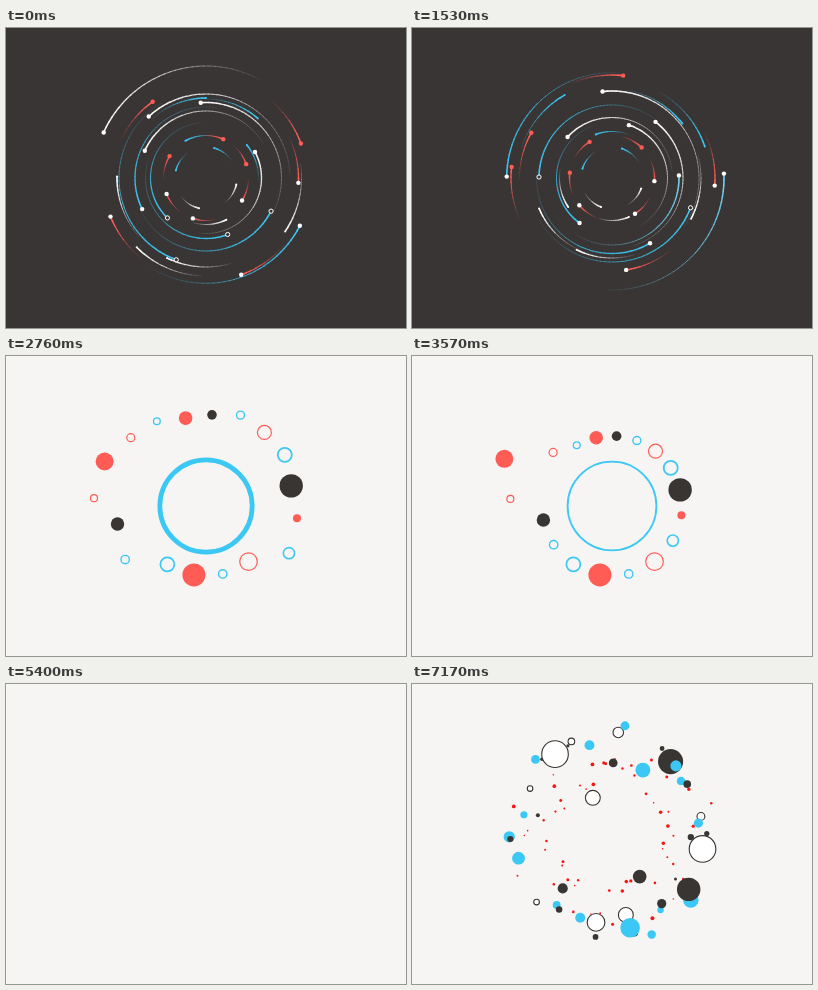
An HTML page with a canvas that plays this animation: 400x300 px, repeating every 7.2 s.

```html
<!DOCTYPE html>
<html lang="en">
<head>
<meta charset="utf-8">
<title>Circles</title>
<style>
html, body { margin: 0; width: 100%; height: 100%; overflow: hidden; background: #3a3535; }
canvas { display: block; width: 100vw; height: 100vh; }
</style>
</head>
<body>
<canvas id="stage"></canvas>
<script>
const W = 400, H = 300, CX = 200, CY = 150, SCENE = 1800, STEP = 30, TAU = Math.PI * 2;
const DARK = '#3a3535', LIGHT = '#f6f5f3', BLUE = '#3cc8f4', RED = '#ff5c55', INK = '#383533', WHITE = '#fff';
const RGB = { blue: [60, 200, 244], red: [255, 92, 85], white: [255, 255, 255] };

const canvas = document.getElementById('stage');
const ctx = canvas.getContext('2d');
const dpr = window.devicePixelRatio || 1;
canvas.width = W * dpr;
canvas.height = H * dpr;
ctx.scale(dpr, dpr);

const clamp = (v, a = 0, b = 1) => Math.min(b, Math.max(a, v));
const lerp = (a, b, k) => a + (b - a) * k;
const easeOut = k => 1 - (1 - k) ** 3;
const easeInOut = k => k * k * (3 - 2 * k);
const rad = d => d * Math.PI / 180;
const mix = (a, b, k) => `rgb(${a.map((v, i) => Math.round(lerp(v, b[i], k))).join()})`;
const polar = (r, deg) => [CX + r * Math.cos(rad(deg)), CY + r * Math.sin(rad(deg))];

function seeded(seed) {
  return () => {
    seed = (seed * 1664525 + 1013904223) % 4294967296;
    return seed / 4294967296;
  };
}

function fillBg(color) {
  ctx.fillStyle = color;
  ctx.fillRect(0, 0, W, H);
}

function disc(x, y, r, fill, stroke, width = 1) {
  ctx.beginPath();
  ctx.arc(x, y, Math.max(0, r), 0, TAU);
  if (fill) { ctx.fillStyle = fill; ctx.fill(); }
  if (stroke) { ctx.strokeStyle = stroke; ctx.lineWidth = width; ctx.stroke(); }
}

// Value at t on a list of [time, value] keys
function track(keys, t) {
  for (let i = 1; i < keys.length; i++) {
    const [t0, a] = keys[i - 1], [t1, b] = keys[i];
    if (t <= t1) return lerp(a, b, easeInOut(clamp((t - t0) / (t1 - t0))));
  }
  return keys[keys.length - 1][1];
}

/* ---- Scene 1: comets on orbits ---- */
// Each group: heads as [radius, angle], tail length, degrees per ms, colours above and below the centre
const comets = [
  { heads: [0, 1, 2, 3].map(i => [31, 12 + i * 91]), tail: () => 40, spin: -0.114, up: 'blue', down: 'white', tip: 1 },
  { heads: [[42.5, 241], [46.5, 64], [52.5, 321]], tail: () => 42, spin: -0.114, up: 'blue', down: 'white', tip: 1 },
  { heads: [[95.5, 34], [98, 135], [79, 311], [80, 270], [89, 181], [89, 116]],
    tail: () => 42, spin: 0.1348, up: 'blue', down: 'white', tip: 1 },
  { heads: [[55.5, 134], [60.5, 69], [73, 27], [84, 227], [87, 110]],
    tail: () => 130, spin: -0.1348, up: 'white', down: 'blue', tip: 2.2, hollow: true },
  { heads: [[55.5, -28], [67, 204], [71, 154], [75.5, 266], [105.3, 27], [112, 204]],
    tail: r => r > 100 ? 94 : 125, spin: -0.1348, up: 'white', down: 'blue', tip: 2.2 },
  { heads: [[101, -20], [103, 70], [103, 158], [93, 235], [92.5, 3]],
    tail: () => 29, spin: 0.1348, up: 'red', down: 'red', tip: 2.2 },
  { heads: [32, 108, 158, 211, 294, 341].map(a => [42.5, a]),
    tail: () => 30, spin: 0.1348, up: 'red', down: 'red', tip: 2.2 }
];

function streak(r, head, len, color) {
  const n = Math.ceil(Math.abs(len) / 3);
  ctx.strokeStyle = color;
  for (let i = 0; i < n; i++) {
    const k = i / n;
    ctx.globalAlpha = lerp(1, 0.2, k);
    ctx.lineWidth = lerp(1.6, 0.3, k);
    ctx.beginPath();
    ctx.arc(CX, CY, r, rad(head + len * k), rad(head + len * (i + 1.15) / n), len < 0);
    ctx.stroke();
  }
  ctx.globalAlpha = 1;
}

function orbits(t) {
  fillBg(DARK);
  for (const { heads, tail, spin, up, down, tip, hollow } of comets) {
    for (const [r, a0] of heads) {
      const a = a0 + spin * t;
      const low = clamp((Math.sin(rad(a)) + 0.1) * 12);
      const color = mix(RGB[up], RGB[down], low);
      streak(r, a, -Math.sign(spin) * tail(r), color);
      if (hollow && low > 0.5) disc(...polar(r, a), 2.1, DARK, WHITE, 1);
      else disc(...polar(r, a), tip, tip < 2 ? color : mix(RGB[up], RGB.white, low));
    }
  }
}

/* ---- Scene 2: ring and bubbles ---- */
// One letter per bubble around the ring, capitals are filled
const kinds = 'rRrbRKbrbKRbrbRbbK';
const sizes = [3.5, 9, 4, 3.4, 6.8, 4.8, 4, 7, 7, 11.7, 4, 5.6, 8.8, 4.2, 11.5, 7, 4.2, 6.7];
const paint = { r: RED, b: BLUE, k: INK };

const bubbles = [...kinds].map((kind, i) => {
  const size = sizes[i], filled = kind < 'a';
  const leftBump = 52 * Math.exp(-((i - 0.7) ** 2));
  return {
    size, filled, color: paint[kind.toLowerCase()],
    angle: -176 + 20.3 * i - 10 * (1 - Math.cos(i * TAU / 18)),
    far: filled ? 114 - size : 128 - 2 * size,
    end: 70 + leftBump
  };
});

function ring(t) {
  fillBg(LIGHT);
  const grow = easeOut(clamp(t / 240));
  for (const { size, filled, color, angle, far, end } of bubbles) {
    const back = Math.sin(rad(angle)) > 0.7 ? 470 : 1770;
    const d = t < 240 ? far * grow : track([[240, far], [back, end]], t);
    const [x, y] = polar(d, angle);
    if (filled) disc(x, y, size * grow, color);
    else disc(x, y, size * grow, null, color, color === RED ? 1.2 : 0.9 + size * 0.12);
  }
  const outer = track([[0, 0], [240, 96], [480, 84], [1050, 46], [1770, 45.3]], t);
  const inner = track([[0, 0], [240, 46.8], [1050, 43.7], [1770, 43.5]], t);
  if (t < 480) disc(CX, CY, inner, LIGHT);
  disc(CX, CY, (outer + inner) / 2, null, BLUE, Math.max(0.01, outer - inner));
}

/* ---- Scene 3: tendrils ---- */
// Tips of each colour, from the largest dot to the smallest
const tips = {
  white: [[34, 205], [232, 38], [116, 238], [203, 306], [126, 230], [292, 222], [244, 284], [166, 254], [306, 93]],
  red: [[123, 113], [328, 55], [208, 66], [181, 62], [242, 25], [348, 101], [125, 252]],
  blue: [[147, 73], [81, 38], [316, 167], [244, 206], [316, 206], [156, 9], [62, 94], [269, 169], [319, 147],
    [118, 114], [340, 165]]
};

const tendrils = Object.entries(tips).flatMap(([color, list]) => list.map(([x, y], i) => ({
  color, size: lerp(5.2, 2.4, i / (list.length - 1)),
  far: Math.hypot(x - CX, y - CY), angle: Math.atan2(y - CY, x - CX), side: i % 2 ? 1 : -1, phase: i * 2.4
})));

// Points along a wavy line that hooks into its tip
function strand({ far, angle, side, phase }, s, t) {
  const ux = Math.cos(angle), uy = Math.sin(angle), reach = Math.max(30, far * s);
  const at = (d, off) => [CX + ux * d - uy * off, CY + uy * d + ux * off];
  const pts = [at(30, 0)];
  for (let k = 0.17; k < 0.8; k += 0.17) {
    const sway = Math.sin(phase + k * 12 - t * 0.003) * 3.5 + side * 6 * k;
    pts.push(at(lerp(30, reach, k), sway * s));
  }
  pts.push(at(reach - 1, side * 8 * s), at(reach, 0));
  return pts;
}

function smooth(pts) {
  ctx.beginPath();
  ctx.moveTo(...pts[0]);
  for (let i = 0; i < pts.length - 1; i++) {
    const a = pts[i - 1] || pts[i], b = pts[i], c = pts[i + 1], e = pts[i + 2] || c;
    ctx.bezierCurveTo(b[0] + (c[0] - a[0]) / 6, b[1] + (c[1] - a[1]) / 6,
      c[0] - (e[0] - b[0]) / 6, c[1] - (e[1] - b[1]) / 6, c[0], c[1]);
  }
  ctx.strokeStyle = WHITE;
  ctx.lineWidth = 0.7;
  ctx.stroke();
}

function burst(t) {
  fillBg(DARK);
  const s = easeOut(clamp(t / 420)) * lerp(0.97, 1.02, clamp(t / 1650));
  tendrils.forEach(p => smooth(strand(p, s, t)));
  for (const { color, size, far, angle } of tendrils) {
    const x = CX + Math.cos(angle) * far * s, y = CY + Math.sin(angle) * far * s;
    if (color === 'blue') disc(x, y, size - 0.3, BLUE, WHITE, 1);
    else disc(x, y, size, color === 'red' ? RED : WHITE);
  }
  disc(CX, CY, 32.5 * easeOut(clamp(t / 180)), RED);
}

/* ---- Scene 4: confetti wreath ---- */
const HOOP = 'hoop';

function scatter(count, seed, near, far, small, large, color) {
  const rnd = seeded(seed);
  return Array.from({ length: count }, (_, i) => {
    const [x, y] = polar(lerp(near, far, rnd()), (i + rnd()) * 360 / count);
    return { x, y, r: lerp(small, large, rnd() ** 1.5), color };
  });
}

const confetti = [
  ...scatter(60, 11, 45, 98, 0.7, 1.9, '#f91414'),
  ...scatter(8, 5, 78, 98, 2.5, 5, HOOP),
  ...scatter(17, 23, 78, 104, 2.6, 6.6, BLUE),
  ...scatter(14, 42, 66, 98, 1.4, 5, INK),
  // The large ones have fixed places
  ...[
    [146.5, 75, 12.5, HOOP], [182, 116, 7, HOOP], [285, 164, 12.5, HOOP], [213, 226, 7, HOOP], [185, 233, 8.3, HOOP],
    [229, 90, 7, BLUE], [274, 212, 7.3, BLUE], [217, 238, 9.2, BLUE],
    [255, 82, 11.8, INK], [226, 190, 6.4, INK], [272, 202, 11, INK], [260, 86, 5.2, BLUE]
  ].map(([x, y, r, color]) => ({ x, y, r, color }))
];

function wreath(t) {
  fillBg(LIGHT);
  const k = clamp(t / 510), s = k * (1.8 - 0.8 * k);
  const drift = track([[510, 0], [1140, 0.08], [1770, 0.065]], Math.max(510, t));
  const spread = s * (1 + drift), swell = s * (1 + drift);
  for (const { x, y, r, color } of confetti) {
    const px = CX + (x - CX) * spread, py = CY + (y - CY) * spread;
    if (color === HOOP) disc(px, py, r * swell, WHITE, INK, 1.1);
    else disc(px, py, r * swell, color);
  }
}

const scenes = [orbits, ring, burst, wreath];
const start = performance.now();

function frame() {
  const now = Math.max(0, performance.now() - start);
  const t = Math.floor(now / STEP) * STEP % (SCENE * scenes.length);
  scenes[Math.floor(t / SCENE)](t % SCENE);
  requestAnimationFrame(frame);
}
frame();
</script>
</body>
</html>
```
